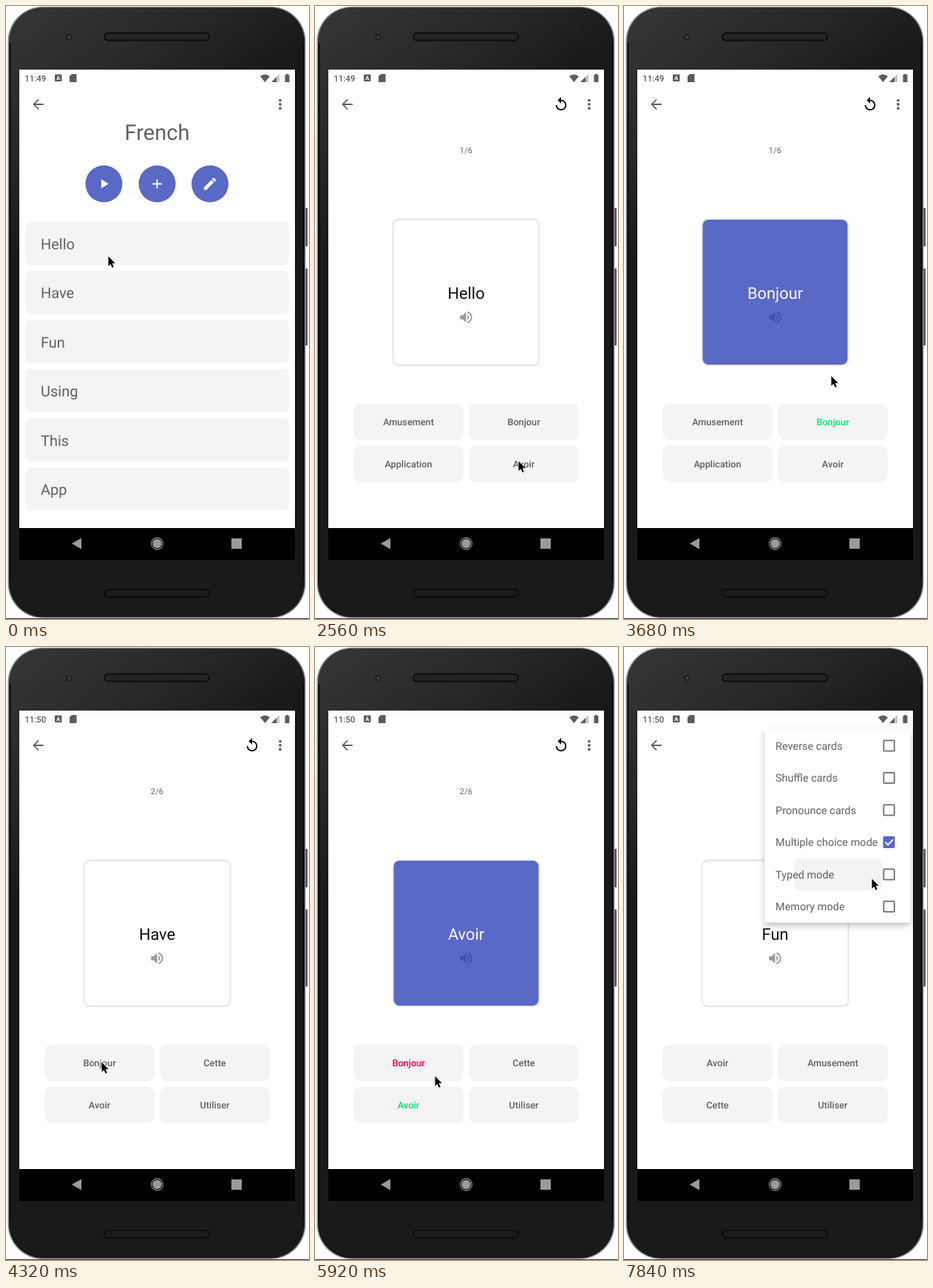
Write an HTML page that moves like this. It is 410 px wide and 829 px high and loops after 8000 ms.

```html
<!DOCTYPE html>
<html lang="en">
<head>
<meta charset="utf-8">
<title>Flash cards</title>
<style>
html, body { margin: 0; width: 100%; height: 100%; overflow: hidden; background: #fff; }
svg { display: block; width: 410px; height: 829px; font-family: Roboto, Inter, sans-serif; fill: #616161; text-rendering: geometricPrecision; }
.mid { text-anchor: middle; }
.label { font-size: 12.7px; font-weight: 500; }
.tint { fill: #5a68c6; }
.white { fill: #fff; }

/* One step is 160 ms, or 2 % of the loop. */
.a { animation: 8s step-end -30ms infinite; }
.clock1 { animation-name: till52; }
.clock2 { animation-name: from52; }
.quiz { animation-name: quiz; }
.q1 { animation-name: till54; }
.q2 { animation-name: second; }
.q3 { animation-name: from82; }
.card1 { animation-name: swipe; transform-origin: 204.5px 387px; }
.card2 { animation-name: till80; }
.back1 { animation-name: from40; }
.back2 { animation-name: from74; }
.right1 { animation-name: right1; }
.wrong2 { animation-name: wrong2; }
.right2 { animation-name: right2; }
.tap1 { animation-name: tap1; }
.tap2 { animation-name: tap2; }
.tap3 { animation-name: tap3; }
.menu { animation-name: from88; }
.hover { animation-name: from98; }
.ring { animation-name: ring; }
.cursor { animation-name: cursor; }

@keyframes till52 { 0% { opacity: 1 } 52%, 100% { opacity: 0 } }
@keyframes till54 { 0% { opacity: 1 } 54%, 100% { opacity: 0 } }
@keyframes till80 { 0% { opacity: 1 } 80%, 100% { opacity: 0 } }
@keyframes from40 { 0% { opacity: 0 } 40%, 100% { opacity: 1 } }
@keyframes from52 { 0% { opacity: 0 } 52%, 100% { opacity: 1 } }
@keyframes from74 { 0% { opacity: 0 } 74%, 100% { opacity: 1 } }
@keyframes from82 { 0% { opacity: 0 } 82%, 100% { opacity: 1 } }
@keyframes from88 { 0% { opacity: 0 } 88%, 100% { opacity: 1 } }
@keyframes from98 { 0% { opacity: 0 } 98%, 100% { opacity: 1 } }
@keyframes quiz { 0% { opacity: 0 } 18% { opacity: .5 } 20%, 100% { opacity: 1 } }
@keyframes second { 0% { opacity: 0 } 54% { opacity: 1 } 82%, 100% { opacity: 0 } }
@keyframes right1 { 0% { fill: #616161 } 38%, 100% { fill: #00e676 } }
@keyframes wrong2 { 0% { fill: #616161 } 60%, 100% { fill: #f50057 } }
@keyframes right2 { 0% { fill: #616161 } 72%, 100% { fill: #00e676 } }
@keyframes tap1 { 0% { opacity: 0 } 38% { opacity: 1 } 40%, 100% { opacity: 0 } }
@keyframes tap2 { 0% { opacity: 0 } 60% { opacity: 1 } 62%, 100% { opacity: 0 } }
@keyframes tap3 { 0% { opacity: 0 } 72% { opacity: 1 } 74%, 100% { opacity: 0 } }
@keyframes swipe {
  0% { transform: none; opacity: 1 }
  50% { transform: translate(-110px, -8px) rotate(-8deg); opacity: 1 }
  52%, 100% { transform: translate(-320px, -20px) rotate(-20deg); opacity: 0 }
}
@keyframes ring {
  0%, 16%, 40%, 52%, 62%, 72%, 80%, 88%, 100% { opacity: 0 }
  14%, 38%, 48%, 60%, 70%, 78%, 86% { opacity: 1 }
}
@keyframes cursor {
  0% { transform: translate(138px, 338px) }
  2% { transform: translate(182px, 374px) }
  4% { transform: translate(213px, 413px) }
  6% { transform: translate(172px, 300px) }
  8% { transform: translate(134px, 229px) }
  14% { transform: translate(130px, 241px) }
  18% { transform: translate(129px, 246px) }
  24% { transform: translate(146px, 286px) }
  26% { transform: translate(188px, 380px) }
  28% { transform: translate(236px, 516px) }
  30% { transform: translate(264px, 628px) }
  32% { transform: translate(275px, 615px) }
  34% { transform: translate(280px, 586px) }
  36% { transform: translate(282px, 566px) }
  46% { transform: translate(280px, 500px) }
  48% { transform: translate(262px, 428px) }
  50% { transform: translate(152px, 420px) }
  52% { transform: translate(108px, 478px) }
  54% { transform: translate(129px, 561px) }
  56% { transform: translate(128px, 564px) }
  58% { transform: translate(127px, 563px) }
  66% { transform: translate(136px, 590px) }
  68% { transform: translate(150px, 618px) }
  70% { transform: translate(153px, 622px) }
  74% { transform: translate(162px, 580px) }
  76% { transform: translate(188px, 452px) }
  78% { transform: translate(212px, 378px) }
  80% { transform: translate(311px, 278px) }
  82% { transform: translate(342px, 212px) }
  84% { transform: translate(367px, 148px) }
  86% { transform: translate(371px, 134px) }
  90% { transform: translate(364px, 154px) }
  92% { transform: translate(354px, 188px) }
  94% { transform: translate(350px, 232px) }
  96% { transform: translate(341px, 286px) }
  98%, 100% { transform: translate(335px, 313px) }
}
</style>
</head>
<body>
<svg viewBox="0 0 410 829">
  <defs>
    <linearGradient id="shell" gradientUnits="userSpaceOnUse" x1="60" y1="0" x2="210" y2="200">
      <stop offset="0" stop-color="#343434"/>
      <stop offset=".5" stop-color="#282828"/>
      <stop offset="1" stop-color="#191919"/>
    </linearGradient>
    <clipPath id="screen"><path d="M18 86h373v620H18z"/></clipPath>
    <clipPath id="typed"><path d="M190 286h197v43H190z"/></clipPath>
    <filter id="shade" x="-10%" y="-10%" width="120%" height="120%">
      <feDropShadow dx="0" dy="4" stdDeviation="4" flood-opacity=".25"/>
    </filter>
    <g id="speaker" transform="translate(193.6 410.1) scale(.907)">
      <path d="M3 9v6h4l5 5V4L7 9zm13.5 3c0-1.77-1.02-3.29-2.5-4.03v8.05c1.48-.73 2.5-2.25 2.5-4.02zM14 3.23v2.06c2.89.86 5 3.54 5 6.71s-2.11 5.85-5 6.71v2.06c4.01-.91 7-4.49 7-8.77s-2.99-7.86-7-8.77z"/>
    </g>
  </defs>

  <!-- Phone -->
  <g>
    <path d="M404 273.500h3.500v51H404zM404 355.500h3.500v103H404z" fill="#5c5c5c" stroke="#222" stroke-width=".7"/>
    <rect x="2.500" y=".8" width="403" height="827" rx="47" fill="#8c8c8c"/>
    <rect x="4" y="2" width="400" height="824.500" rx="46" fill="url(#shell)"/>
    <path d="M5.500 50V775M402.500 50V775" stroke="#0c0c0c" stroke-width="2"/>
    <path d="M0 828.500H410" stroke="#333"/>
    <g fill="#242424" stroke="#0c0c0c" stroke-width="2">
      <rect x="133" y="36.500" width="142" height="10" rx="5"/>
      <rect x="133" y="789" width="142" height="10" rx="5" fill="#1a1a1a"/>
    </g>
    <circle cx="85" cy="42" r="4.500" fill="#232323"/>
    <circle cx="85.500" cy="42" r="1.700" fill="#4a4644"/>
    <path class="white" d="M18 86h373v620H18z"/>
    <path d="M18 706h373v43H18z" fill="#000"/>
    <g fill="#9a9a9a">
      <path d="M89 727l13-7.500v15zM305 720h14v14h-14z"/>
      <circle cx="204.500" cy="727" r="6.200"/>
      <circle cx="204.500" cy="727" r="7.900" fill="none" stroke="#9a9a9a" stroke-width="1.100"/>
    </g>
  </g>

  <g clip-path="url(#screen)">
    <!-- Word list -->
    <g id="list"></g>

    <!-- Quiz -->
    <g class="a quiz">
      <path class="white" d="M18 146h373v560H18z"/>
      <path transform="translate(322.1 122.100) scale(.907)" fill="#000" d="M12 5V1L7 6l5 5V7c3.310 0 6 2.690 6 6s-2.690 6-6 6-6-2.690-6-6H4c0 4.420 3.580 8 8 8s8-3.580 8-8-3.580-8-8-8z"/>
      <g id="quiz"></g>
    </g>

    <!-- Status and tool bar -->
    <g fill="#5c5c5c">
      <g font-size="11.500" font-weight="500">
        <text class="a clock1" x="25.200" y="101.500">11:49</text>
        <text class="a clock2" x="25.200" y="101.500">11:50</text>
      </g>
      <rect x="66" y="92.500" width="9.500" height="9.500" rx="1"/>
      <text class="mid white" x="70.750" y="100" font-size="7.500" font-weight="700">A</text>
      <path d="M89 92h6.500v11H86v-8z"/>
      <path d="M344 95q6.500-5 13 0l-6.500 8zM377.500 93h1.700v-1.200h2.600V93h1.700v10h-6z"/>
      <path d="M370 92v11h-11z" fill="#c4c4c4"/>
      <path d="M366 96v7h-7z"/>
    </g>
    <path transform="translate(32.600 122.100) scale(.907)" d="M20 11H7.830l5.590-5.590L12 4l-8 8 8 8 1.410-1.410L7.830 13H20z"/>
    <circle cx="371" cy="127.600" r="1.900"/>
    <circle cx="371" cy="133" r="1.900"/>
    <circle cx="371" cy="138.400" r="1.900"/>

    <!-- Options -->
    <g class="a menu">
      <rect class="white" x="190" y="111" width="197.500" height="261.500" rx="2" filter="url(#shade)"/>
      <circle class="a hover" cx="290" cy="307.500" r="61" clip-path="url(#typed)" style="fill:#f3f3f3"/>
      <g id="menu"></g>
    </g>
  </g>

  <!-- Pointer -->
  <g class="a cursor">
    <circle class="a ring" r="21.500" fill="none" stroke="#111" stroke-width="1.400"/>
    <path d="M.5 .5V13.700L3.500 10.900 5.700 15.800 7.800 14.900 5.700 10.100H9.800z" fill="#000" stroke="#fff" stroke-width="1.600" paint-order="stroke"/>
  </g>
</svg>

<script>
const fill = (id, html) => document.getElementById(id).innerHTML = html;
const text = (x, y, size, str, attrs = '') =>
  `<text x="${x}" y="${y}" font-size="${size}" ${attrs}>${str}</text>`;
const box = (x, y, w, h, r, attrs) =>
  `<rect x="${x}" y="${y}" width="${w}" height="${h}" rx="${r}" ${attrs}/>`;

const actions = [
  [132.5, 'M8 5v14l11-7z'],
  [204.5, 'M19 13h-6v6h-2v-6H5v-2h6V5h2v6h6z'],
  [276, 'M3 17.25V21h3.75L17.81 9.94l-3.75-3.75zM20.71 7.04c.39-.39.39-1.02 0-1.41l-2.34-2.34c-.39-.39-1.02-.39-1.41 0l-1.83 1.83 3.75 3.75z'],
];
const action = ([x, d]) => `<circle class="tint" cx="${x}" cy="240.5" r="25"/>
  <path class="white" transform="translate(${x - 10.9} 229.6) scale(.907)" d="${d}"/>`;
const row = (word, i) => {
  const y = 291.5 + i * 66.5;
  return box(26, y, 357, 58.5, 8, 'fill="#f4f4f4"') + text(47, y + 37, 20, word);
};
fill('list', text(204.5, 181, 29, 'French', 'class="mid"') + actions.map(action).join('') +
  ['Hello', 'Have', 'Fun', 'Using', 'This', 'App'].map(row).join(''));

const face = (word, ink, icon) =>
  text(204.5, 395.7, 21.8, word, `class="mid" fill="${ink}"`) + `<use href="#speaker" fill="${icon}"/>`;

function card(n, front, back) {
  const cover = back ? `<g class="a back${n}">
    ${box(105.5, 288, 198, 198, 8, 'fill="#e6e7f2"')}${box(106.5, 289, 196, 196, 8, 'class="tint"')}
    ${face(back, '#fff', '#4150b2')}</g>` : '';
  return `<g class="a card${n}">
    ${box(105.5, 288.5, 198, 197.5, 8, 'fill="#fff" stroke="#e4e4e4" stroke-width="1.8"')}
    ${face(front, '#0c0c0c', '#9a9a9a')}${cover}</g>`;
}

// Answers are [word, label class, press class].
function answer([word, mark, tap], i) {
  const x = i % 2 ? 208 : 52, y = i > 1 ? 594.5 : 537.5;
  return box(x, y, 149, 49.5, 10, 'fill="#f4f4f4"') +
    (tap ? box(x, y, 149, 49.5, 10, `class="a ${tap}" fill="#e0e0e0"`) : '') +
    text(x + 74.5, y + 29.5, 12.7, word, `class="mid label ${mark ? 'a ' + mark : ''}"`);
}

const question = (n, front, back, answers) => `<g class="a q${n}">
  ${text(204.5, 199, 10.9, n + '/6', 'class="mid" letter-spacing=".2"')}
  ${answers.map(answer).join('')}${card(n, front, back)}</g>`;

fill('quiz',
  question(1, 'Hello', 'Bonjour',
    [['Amusement'], ['Bonjour', 'right1', 'tap1'], ['Application'], ['Avoir']]) +
  question(2, 'Have', 'Avoir',
    [['Bonjour', 'wrong2', 'tap2'], ['Cette'], ['Avoir', 'right2', 'tap3'], ['Utiliser']]) +
  question(3, 'Fun', '', [['Avoir'], ['Amusement'], ['Cette'], ['Utiliser']]));

const modes = ['Reverse cards', 'Shuffle cards', 'Pronounce cards',
  'Multiple choice mode', 'Typed mode', 'Memory mode'];
const option = (name, i) => {
  const y = 133.5 + i * 43.5;
  const check = i === 3
    ? box(350.5, y - 8, 16, 16, 2, 'class="tint"') +
      `<path d="M353.500 ${y}l3.600 3.700 7-7.200" fill="none" stroke="#fff" stroke-width="1.8"/>`
    : box(351.4, y - 7.2, 14.4, 14.4, 1, 'fill="#fff" stroke="#6e6e6e" stroke-width="1.8"');
  return text(205, y + 5.3, 14.5, name) + check;
};
fill('menu', modes.map(option).join(''));
</script>
</body>
</html>
```
